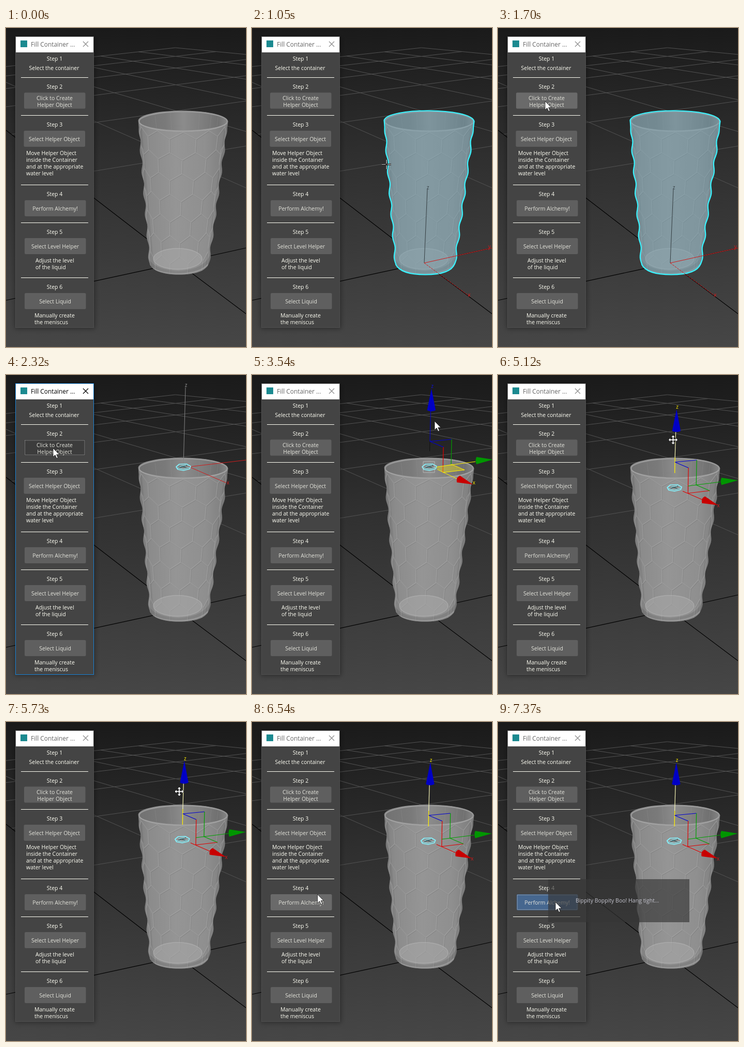
Recreate the animation shown at these times as an HTML page. Size 464 by 615 pixels, loop 8000 ms.

```html
<!DOCTYPE html>
<html lang="en">
<head>
<meta charset="utf-8">
<title>Fill Container</title>
<style>
  html, body { margin: 0; width: 100%; height: 100%; overflow: hidden; background: #303030; }
  svg { display: block; width: 464px; height: 615px; }
  text { font: 10.5px "Open Sans", "Noto Sans", sans-serif; fill: #fffff4; }
  .mid { text-anchor: middle; }
  .btn text { fill: #e4e4dc; }
  .axis { fill: none; stroke-width: 1; }
  .tag { font-size: 10px; text-anchor: middle; }
</style>
</head>
<body>
<svg viewBox="0 0 464 615">
  <defs>
    <linearGradient id="floor" x2="0" y2="1">
      <stop offset="0" stop-color="#1a1a1a"/><stop offset=".4" stop-color="#2f2f2f"/><stop offset="1" stop-color="#464646"/>
    </linearGradient>
    <linearGradient id="body">
      <stop offset="0" stop-color="#7e7e7e"/><stop offset=".12" stop-color="#8b8b8b"/>
      <stop offset=".42" stop-color="#959595"/><stop offset=".75" stop-color="#8f8f8f"/><stop offset="1" stop-color="#7c7c7c"/>
    </linearGradient>
    <linearGradient id="inside">
      <stop offset="0" stop-color="#727272"/><stop offset=".3" stop-color="#7a7a7a"/><stop offset=".5" stop-color="#8b8b8b"/>
      <stop offset=".72" stop-color="#7e7e7e"/><stop offset=".9" stop-color="#707070"/><stop offset="1" stop-color="#858585"/>
    </linearGradient>
    <filter id="blur" x="-20%" width="140%"><feGaussianBlur stdDeviation="5"/></filter>
    <clipPath id="glassClip"><path class="glassPath"/></clipPath>
  </defs>

  <rect width="464" height="615" fill="url(#floor)"/>
  <path id="grid" fill="none" stroke="#525252"/>
  <path d="M0 197 333 453 464 551M0 525 333 453 464 424" fill="none" stroke="#000" stroke-width="1.1"/>

  <g id="glass">
    <path class="glassPath" fill="url(#body)"/>
    <g clip-path="url(#glassClip)" fill="none">
      <path d="M258 190 282 462M427 190 390 462" stroke="#000" stroke-opacity=".06" stroke-width="9"/>
      <path id="hexDark" stroke="#666" stroke-opacity=".3" stroke-width="1.2" transform="translate(1 1.2)"/>
      <path id="hexLight" stroke="#b0b0b0" stroke-opacity=".4" stroke-width="1.5"/>
      <path d="M272 436Q279 466 334 468 387 465 396 433V480H270Z" fill="#000" fill-opacity=".1"/>
      <path d="M279 461Q300 474 336 474 377 472 390 456" stroke="#a8a8a8" stroke-opacity=".6" stroke-width="2"/>
    </g>
    <ellipse cx="332" cy="445" rx="47" ry="20" fill="#a6a6a6" fill-opacity=".6" stroke="#b6b6b6" stroke-opacity=".6" stroke-width="1.3"/>
    <ellipse cx="342.5" cy="180" rx="85" ry="18.6" fill="url(#inside)" stroke="#999" stroke-width="2.2"/>
    <path d="M288 168 291 193M318 163 320 197M345 162V198M374 163 372 197M397 167 394 193M410 171 408 189" stroke="#999" stroke-opacity=".25"/>
    <path d="M258 184Q278 199 342 199 408 199 427 184" fill="none" stroke="#a6a6a6" stroke-width="1.5"/>
  </g>
  <path id="tint" class="glassPath" fill="#6c9fb4" fill-opacity=".42"/>
  <path id="outline" class="glassPath" fill="none" stroke-width="2.2" stroke-linejoin="round"/>

  <g id="pivot" class="axis">
    <path d="M333 453 339 311" stroke="#333c40"/>
    <path d="M464 424 333 453" stroke="#d01c1c"/>
    <path d="M333 453 420 517" stroke="#d01c1c" stroke-dasharray="4 1.5"/>
    <text class="tag" x="340" y="311" style="fill:#333c40">z</text>
    <text class="tag" x="459" y="425" style="fill:#d01c1c">y</text>
    <text class="tag" x="420" y="518" style="fill:#d01c1c">x</text>
  </g>

  <g id="helper">
    <g id="tripod" class="axis">
      <path d="M343 174 347 24" stroke="#858585"/>
      <path d="M464 164 354 177 426 208" stroke="#d01c1c"/>
      <text class="tag" x="348" y="23" style="fill:#999">z</text>
      <text class="tag" x="429" y="211" style="fill:#d01c1c">x</text>
    </g>
    <g fill="none" stroke="#84f4ff" stroke-width="1.7" stroke-linejoin="round">
      <path d="M329 177 335 172 349 171.500 357 176 355 181 343 184 332 182Z"/>
      <path d="M335 179 350 174M337 175 351 180" stroke="#2b4a50" stroke-width="1.2"/>
      <path d="M331 179 343 181.500 355 178M336 176 348 174" stroke-width="1"/>
    </g>
    <g id="gizmo" class="axis">
      <path id="zBlue" d="M345.500 67 344 128" stroke="#0000d0"/>
      <path id="zDark" d="M344 128 343.500 147" stroke="#111"/>
      <g id="zHot">
        <path d="M345.500 67 344 119" stroke="#f6f4b4" stroke-width="1.2"/>
        <path d="M344 119 343.500 149" stroke="#ffee00" stroke-width="1.3"/>
      </g>
      <path d="M370 139 344 128 386 124" stroke="#0000d0" stroke-width="1.2"/>
      <path d="M370 139 369 188" stroke="#e00000" stroke-width="1.2"/>
      <path d="M386 124 385 172" stroke="#00a000" stroke-width="1.2"/>
      <g id="xyCold">
        <path d="M359 184 396 200M369 188 411 183" stroke="#e00000" stroke-width="1.2"/>
        <path d="M369 174 432 166M385 172 411 183" stroke="#00a000" stroke-width="1.2"/>
        <text class="tag" x="428" y="215" style="fill:#d01c1c">x</text>
      </g>
      <g id="xyHot" stroke="#ffee00">
        <path d="M354 178 385 172 411 183 369 188Z" fill="#ffee00" fill-opacity=".35" stroke="none"/>
        <path d="M432 167 358 177M358 182 396 200M385 172 411 183 369 188"/>
        <path d="M331 167H353V188H331Z" stroke="#c8c8c8" stroke-opacity=".7"/>
        <text class="tag" x="429" y="211" style="fill:#ffee00;stroke:none">x</text>
      </g>
      <path d="M347 26 355 68Q347 72 338.500 68Z" fill="#0000c4"/>
      <path d="M466 163 434 158Q431 165 434 172Z" fill="#009600"/>
      <path d="M427 211 402 194Q394 197 396 207Z" fill="#c80000"/>
      <text id="zTag" class="tag" x="348.500" y="24.500">z</text>
    </g>
  </g>

  <g id="panel">
    <rect x="17" y="18" width="155" height="562" fill="#000" fill-opacity=".35" filter="url(#blur)"/>
    <rect x="18" y="16" width="152" height="562" fill="#444"/>
    <rect x="18" y="16" width="152" height="31" fill="#fff"/>
    <rect x="28" y="24" width="13" height="13" fill="#1b8a90"/>
    <text id="title" x="48" y="35.500" style="font-size:11.9px">Fill Container ...</text>
    <path id="close" d="M149 26 159 36M159 26 149 36" stroke-width="1.2"/>
    <path d="M29 95.500H159M29 168.500H159M29 302.500H159M29 375.500H159M29 481.500H159" stroke="#fffff4"/>
    <rect id="frame" x="18.500" y="16.500" width="151" height="561" fill="none"/>
  </g>

  <g id="popup">
    <rect x="97" y="303" width="273" height="83" fill="#363636" fill-opacity=".66"/>
    <text x="150" y="348" style="fill:#c6c6d0">Bippity Boppity Boo! Hang tight...</text>
  </g>

  <g id="arrow"><path d="M0 0V17L4 13.300 6.800 19.600 9.400 18.500 6.700 12.300H12Z" fill="#fff" stroke="#111" stroke-width=".8"/></g>
  <g id="cross" fill="none">
    <path d="M-9 0H-2M2 0H9M0-9V-2M0 2V9" stroke="#000" stroke-width="3"/>
    <path d="M-9 0H-2M2 0H9M0-9V-2M0 2V9" stroke="#fff" stroke-width="1.2"/>
  </g>
  <g id="move">
    <path d="M0-9 4-5H1.300V-1.300H5V-4L9 0 5 4V1.300H1.300V5H4L0 9-4 5H-1.300V1.300H-5V4L-9 0-5-4V-1.300H-1.300V-5H-4Z" fill="#fff" stroke="#111" stroke-width=".8"/>
  </g>
</svg>
<script>
const $ = id => document.getElementById(id);
const NS = 'http://www.w3.org/2000/svg';
const add = (parent, tag, attrs, content = '') => {
  const el = document.createElementNS(NS, tag);
  for (const k in attrs) el.setAttribute(k, attrs[k]);
  el.textContent = content;
  return parent.appendChild(el);
};
const set = (id, attrs) => { for (const k in attrs) $(id).setAttribute(k, attrs[k]); };
const show = (id, on) => { $(id).style.display = on ? '' : 'none'; };
const line = pts => 'M' + pts.map(p => p.map(n => n.toFixed(1)).join(' ')).join('L');

// Perspective ground grid with a vanishing point per axis
const CELLS = 6;
const ground = (u, v) => {
  const s = u * .55, t = v * .085, w = 1 + s + t;
  return [(333 - 284 * s + 4273 * t) / w, (453 - 20 * s - 400 * t) / w];
};
let grid = '';
for (let i = 1; i <= CELLS; i++) grid += line([ground(i, 0), ground(i, CELLS)]) + line([ground(0, i), ground(CELLS, i)]);
set('grid', { d: grid });

// Glass silhouette with slightly bulging sides
const edge = (y, side) => {
  const k = (y - 183) / 277;
  const bulge = 1.7 * Math.cos((y - 238) / 41 * 2 * Math.PI) * Math.min(1, Math.max(0, (y - 190) / 20));
  return side < 0 ? 256 + 22 * k - bulge : 429 - 37.5 * k + bulge;
};
const ys = Array.from({ length: 69 }, (_, i) => 183 + i * 4);
const right = ys.map(y => [edge(y, 1), y]);
const left = ys.map(y => [edge(y, -1), y]).reverse();
const glass = `M255.5 178C262 153 423 153 429.5 180L${line(right).slice(1)}` +
  `C386 469 365 475.5 335 475.5 303 475.5 284 468 278 456L${line(left).slice(1)}Z`;
document.querySelectorAll('.glassPath').forEach(p => p.setAttribute('d', glass));

// Honeycomb wrapped round the glass
const wrap = (a, y) => {
  const k = (y - 183) / 257, r = a * Math.PI / 180;
  return [342.5 - 7.5 * k + (86 - 28 * k) * Math.sin(r), y + 15 * Math.cos(r) - 8];
};
let hex = '';
for (let row = 0; row < 7; row++) {
  const y = 200 + row * 40, odd = row % 2;
  const zig = [];
  for (let j = -6; j <= 6; j++) zig.push(wrap(j * 18, y + ((j + odd) % 2 ? 8 : -6)));
  hex += line(zig);
  for (let j = -6; j <= 6; j++)
    if ((j + odd) % 2) hex += line([wrap(j * 18, y + 8), wrap(j * 18, y + 34)]);
}
set('hexDark', { d: hex });
set('hexLight', { d: hex });

// Panel contents
const label = (x, y, s, mid) => add($('panel'), 'text', mid ? { x, y, class: 'mid' } : { x, y }, s);
[63, 117, 190, 324, 397, 503].forEach((y, i) => label(94, y, 'Step ' + (i + 1), true));
label(93, 81, 'Select the container', true);
const para = (x, y, rows) => rows.forEach((s, i) => label(x, y + 13 * i, s));
para(39, 245, ['Move Helper Object', 'inside the Container', 'and at the appropriate', 'water level']);
para(57, 452, ['Adjust the level', 'of the liquid']);
para(55, 558, ['Manually create', 'the meniscus']);
const button = (x, y, rows) => {
  const g = add($('panel'), 'g', { class: 'btn' });
  const face = add(g, 'rect', { x, y, width: 118.5, height: 31, rx: 2.5 });
  const dots = add(g, 'rect', { x: x + 1.5, y: y + 1.5, width: 115.5, height: 28, fill: 'none', stroke: '#b4b4b4', 'stroke-dasharray': '1 1' });
  rows.forEach((s, i) => add(g, 'text', { x: x + 59, y: y + (rows.length > 1 ? 14 : 20) + 13 * i, class: 'mid' }, s));
  return (fill, focus) => {
    face.setAttribute('fill', fill);
    dots.style.display = focus ? '' : 'none';
  };
};
const IDLE = '#5f5f5f', HOVER = '#6a6a6a';
const create = button(35, 124.5, ['Click to Create', 'Helper Object']);
const perform = button(36, 332, ['Perform Alchemy!']);
const plain = [button(34.5, 198, ['Select Helper Object']), button(36, 405, ['Select Level Helper']), button(36, 511, ['Select Liquid'])];
plain.forEach(b => b(IDLE, false));

// Stepped timelines: the last entry not later than t holds
const at = (track, t) => track.reduce((cur, e) => e[0] <= t ? e : cur);
const glide = (t0, t1, n, [x0, y0], [x1, y1], kind) => Array.from({ length: n }, (_, i) => {
  const k = i / (n - 1), e = k * k * (3 - 2 * k);
  return [t0 + (t1 - t0) * k, x0 + (x1 - x0) * e, y0 + (y1 - y0) * e, kind];
});
const drag = [[0, 0], [4220, 6], [4290, 14], [4360, 22], [4500, 28.5], [4640, 30], [4820, 32], [5030, 36], [5120, 40],
  [5350, 43], [5430, 45], [5500, 46.5], [5730, 49], [5780, 50], [5950, 51], [6010, 52]];
const cursor = [
  [0, 0, 0, ''], [150, 387, 596, 'arrow'], [220, 381, 505, 'arrow'], [290, 376, 440, 'arrow'],
  [430, 364, 420, 'cross'], [500, 357, 411, 'cross'], [570, 355, 409, 'cross'],
  [1050, 260, 263, 'cross'], [1120, 205, 222, 'cross'], [1190, 150, 188, 'arrow'], [1260, 116, 162, 'arrow'],
  [1330, 100, 149, 'arrow'], [1400, 94, 143, 'arrow'], [1470, 92, 142, 'arrow'], [1700, 91, 141, 'arrow'],
  ...glide(2800, 3540, 11, [98, 140], [353, 89], 'arrow'),
  [3690, 350, 86, 'move'], [3930, 347, 86, 'move'], [4000, 345, 85, 'move'], [4070, 343, 85, 'move'],
  ...glide(6150, 6600, 7, [322, 148], [111, 347], 'arrow')
];

function draw(t) {
  const picked = t >= 570 && t < 2320, hover = t >= 430 && t < 570;
  show('tint', picked);
  show('pivot', picked);
  show('outline', picked || hover);
  set('outline', { stroke: picked ? '#38f4ff' : '#f4e63c' });

  const moving = t >= 3170, hot = t >= 3690, dy = at(drag, t)[1];
  show('helper', t >= 2320);
  show('tripod', !moving);
  show('gizmo', moving);
  show('zHot', hot);
  show('zBlue', !hot);
  show('zDark', !hot);
  show('xyHot', !hot);
  show('xyCold', hot);
  set('helper', { transform: `translate(${-dy * .045} ${dy})` });
  $('zTag').style.fill = hot ? '#ffee00' : '#1010e0';

  const active = (t >= 2230 && t < 3020) || (t >= 6780 && t < 7370);
  set('frame', { stroke: active ? '#1883d7' : '#4f4f4f' });
  set('close', { stroke: active ? '#000' : '#8c8c8c' });
  $('title').style.fill = active ? '#000' : '#666';
  const pressed = t >= 2230 && t < 2874;
  create(pressed ? '#3c3c3c' : t >= 1260 && t < 2230 ? HOVER : IDLE, pressed);
  perform(t >= 6780 ? '#46678f' : t >= 6525 ? HOVER : IDLE, t >= 6780);

  show('popup', t >= 6780);
  set('popup', { opacity: t < 6850 ? .3 : t < 6920 ? .65 : 1 });

  let [, x, y, kind] = at(cursor, t);
  if (kind === 'move' && t >= 4220) { x = 343 - Math.max(0, dy - 28.5) * .39; y = 85 + dy; }
  for (const id of ['arrow', 'cross', 'move']) show(id, id === kind);
  if (kind) set(kind, { transform: `translate(${x} ${y})` });
}

const start = performance.now();
function tick() {
  draw((performance.now() - start) % 8000);
  requestAnimationFrame(tick);
}
tick();
</script>
</body>
</html>
```
